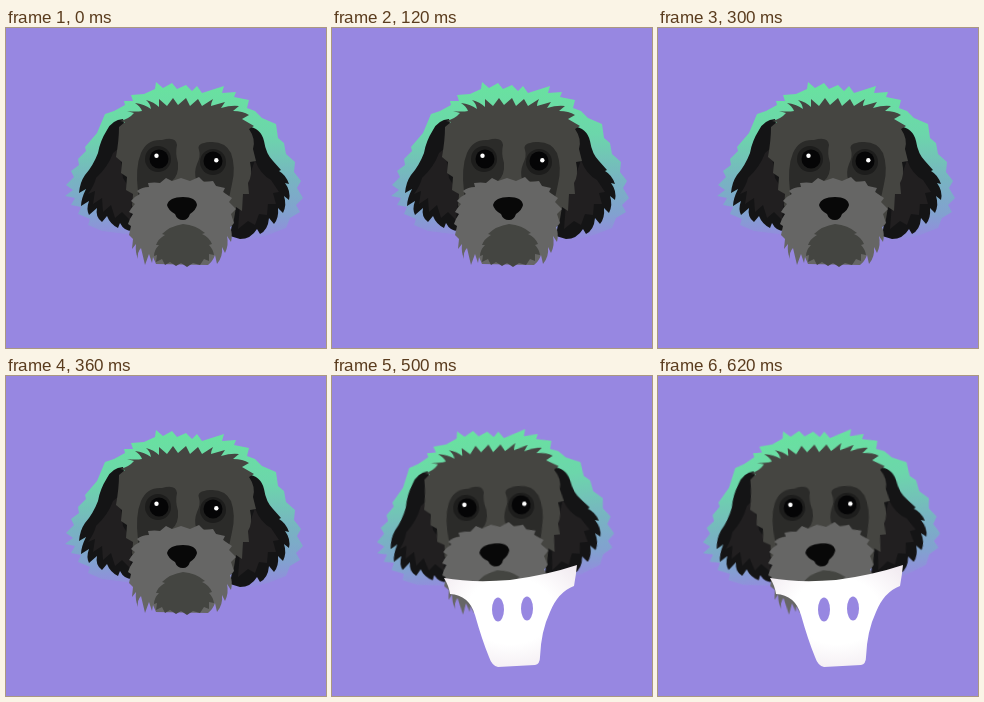
An HTML page for the animation above (700 ms loop, 320 by 320 pixels).

```html
<!DOCTYPE html>
<html lang="en">
<head>
<meta charset="utf-8">
<title>Dog</title>
<style>
  html, body { margin: 0; width: 100%; height: 100%; overflow: hidden; background: #9787e1; }
  svg { display: block; width: 100vw; height: 100vh; }
  #head { transform-origin: 177px 180px; }
  #pants { transform-origin: 180.5px 232.5px; }
</style>
</head>
<body>
<svg viewBox="0 0 320 320">
  <defs>
    <linearGradient id="halo" gradientUnits="userSpaceOnUse" x1="0" y1="60" x2="0" y2="214">
      <stop offset="0" stop-color="#69e1a0"/>
      <stop offset=".3" stop-color="#6cd6ab"/>
      <stop offset=".6" stop-color="#78b3c2"/>
      <stop offset=".82" stop-color="#82a1d0"/>
      <stop offset="1" stop-color="#9787e1"/>
    </linearGradient>
    <filter id="soft" x="-10%" y="-10%" width="120%" height="120%"><feGaussianBlur stdDeviation=".6"/></filter>
    <radialGradient id="cloth" cx=".5" cy=".45" r=".65">
      <stop offset=".5" stop-color="#fff"/>
      <stop offset="1" stop-color="#f1eaf0"/>
    </radialGradient>
  </defs>

  <g id="head">
    <path fill="url(#halo)" filter="url(#soft)" d="M59 168L67 162 60 157 68 149 65 143 73 137 72 131 80 123 79 119 91 105 99 86 108 83 119 77 118 73 127 73 125 67 138 66 149 61 150 54 157 60 166 55 171 61 180 57 186 63 191 58 196 65 218 58 216 65 230 64 228 69 243 72 241 80 249 83 256 90 270 96 272 110 278 115 280 126 289 134 288 144 295 153 291 160 297 170 290 177 294 184 284 190 280 200 262 207 240 213 120 206 96 203 82 197 84 191 72 186 75 179 65 177 69 170Z"/>

    <g fill="#141415">
      <path d="M117 91Q106 92 101 102Q94 113 92 125Q87 138 79 147Q74 154 73 165L80 161Q75 171 75 178L83 173Q80 181 83 187L91 180Q89 189 96 194L101 188Q104 196 112 200L114 195Q118 203 126 203L135 166Z"/>
      <path d="M241 98Q255 100 258 113Q260 126 267 133L275 142 273 143Q280 147 283 156L279 155Q285 163 283 172L278 168Q281 177 277 185L272 180Q273 190 268 196L263 190Q262 202 254 206L251 201Q245 211 234 211L224 208 231 166Z"/>
    </g>
    <g fill="#211f20">
      <path d="M107 125Q102 139 90 150Q88 158 82 166L89 163 87 176 96 170 97 184 105 177 109 190 116 184 124 192 127 166 117 150 113 120Z"/>
      <path d="M249 132Q254 146 265 152L273 164 267 165 270 176 262 176 261 187 253 186 249 197 242 193 232 201 234 175Z"/>
    </g>

    <path fill="#454541" d="M113 99L119 94 114 93Q123 91 128 85L121 83Q130 84 136 83Q134 78 129 75Q138 76 145 81Q144 75 140 72Q148 74 153 79L153 71 161 78 167 70 172 77 180 70 184 78 192 71 196 78 207 71Q205 75 205 78L219 74 215 80Q225 77 233 78L227 83Q237 83 243 87L236 91 248 98 243 101Q250 111 247 121L250 133 244 134Q247 147 242 155L243 166 237 166 236 183 230 179 227 197 180 224 132 195 126 177 127 166 120 162 121 149 115 145 116 134 110 129Q113 112 113 99Z"/>

    <g fill="#2b2b29">
      <path d="M132 164Q129 139 135 125Q141 111 156 112Q170 108 171 117Q169 125 172 135Q173 147 166 153L148 157 132 167Z"/>
      <path d="M193 122Q190 115 204 114Q219 113 225 125Q230 139 226 156L223 170 215 161 204 154 190 152Q188 143 191 136Q195 128 193 122Z"/>
    </g>
    <g fill="#1d1d1c"><circle cx="152" cy="131" r="13"/><circle cx="207" cy="134" r="13"/></g>
    <g fill="#050506"><circle cx="153" cy="131" r="9.5"/><circle cx="207" cy="133" r="9.5"/></g>
    <g fill="#fff"><circle cx="150.5" cy="127.7" r="2.2"/><circle cx="210.3" cy="132.3" r="2.2"/></g>

    <path fill="#666665" d="M123 207L125 198 122 196Q124 190 127 186L123 184Q126 179 129 176L125 173Q129 168 134 166L131 163Q136 159 143 159L142 155Q149 154 154 155L160 150 166 153 175 150 184 153 193 149 198 154 207 153 210 158 219 160 217 164 226 170 223 174 230 181 225 186 228 195 224 199Q227 206 225 214L221 208Q223 217 219 225L216 219Q217 229 211 236L209 227Q207 233 202 237L150 236 147 229 146 235 143 226 139 237 135 220Q131 224 132 231Q129 224 130 216L126 221 127 211Z"/>
    <path fill="#444541" d="M177 196Q164 198 156 206L159 207Q152 211 150 217L153 217Q148 222 148 228L151 227 150 234 156 231 159 237 164 234 170 238 175 235 181 239 187 235 194 237 198 231 203 233 203 226 208 227Q207 221 203 217L206 216Q203 209 196 206L199 205Q190 197 177 196Z"/>
    <path fill="#080808" d="M161 177Q163 169 177 169Q190 169 191 177Q190 182 184 186Q182 192 177 192Q171 192 169 186Q162 182 161 177Z"/>
  </g>

  <g id="pants">
    <path fill="url(#cloth)" d="M112 202Q140 207 178 204Q215 199 245 189Q244 199 242 210Q226 216 218 236Q209 255 208 281Q208 288 203 289L166 291Q160 290 157 281Q150 264 143 239Q137 219 118 218Q117 210 112 202Z"/>
    <g fill="#9787e1">
      <ellipse cx="166" cy="233.5" rx="6" ry="12"/>
      <ellipse cx="195" cy="232.5" rx="6" ry="12"/>
    </g>
  </g>
</svg>
<script>
  const LOOP = 700;

  // Each step is [start in ms, x, y, degrees] and holds until the next one.
  const moves = {
    head: [[0, 0, 0, 0], [200, -12.2, 13.5, -9], [300, 0, 0, 0], [500, -13.4, -1.6, -5.3]],
    pants: [[0, 0, 140, 6], [400, -13.5, 66.5, 6], [500, 0, 0, 0]]
  };

  const pose = ([, x, y, turn]) => `translate(${x}px, ${y}px) rotate(${turn}deg)`;

  for (const [id, steps] of Object.entries(moves)) {
    const frames = steps.map(step => ({
      offset: step[0] / LOOP, transform: pose(step), easing: 'steps(1, end)'
    }));
    frames.push({ offset: 1, transform: pose(steps[steps.length - 1]) });
    document.getElementById(id).animate(frames, { duration: LOOP, iterations: Infinity });
  }
</script>
</body>
</html>
```
